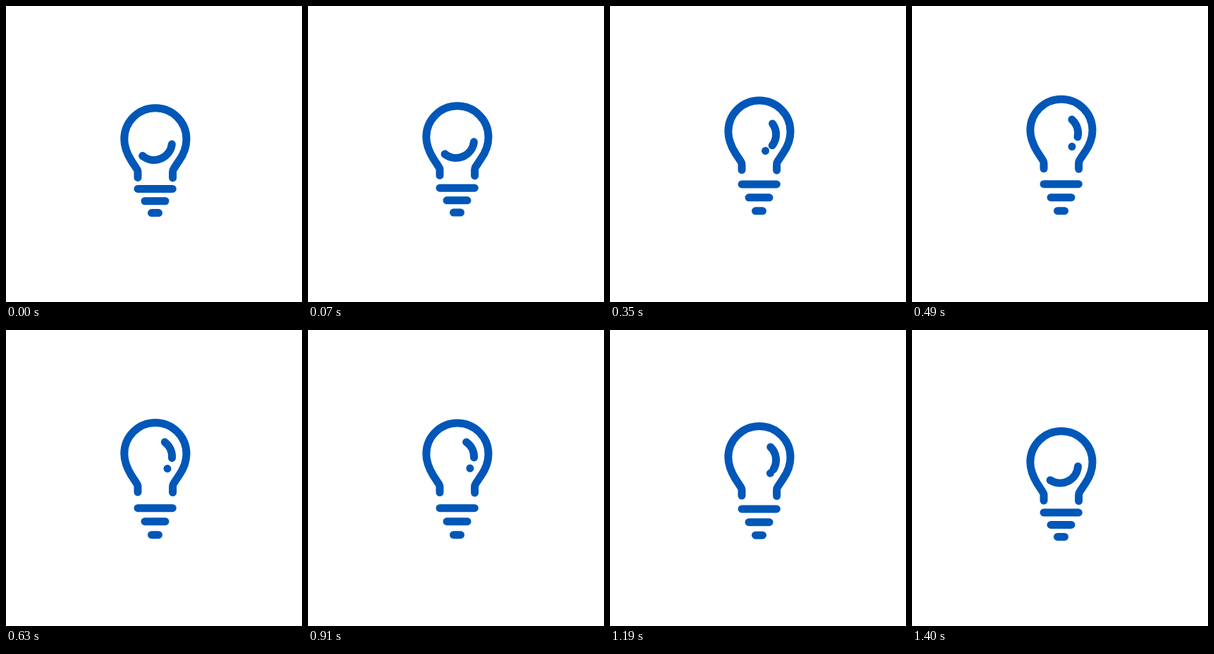
An HTML page that plays this animation: 420 by 420 pixels, repeating every 1470 ms.

```html
<!DOCTYPE html>
<html lang="en">
<head>
<meta charset="utf-8">
<title>Light bulb</title>
<style>
  html, body { margin: 0; width: 100%; height: 100%; overflow: hidden; background: #fff; }
  svg { display: block; width: 100%; height: 100%; }
  path { fill: none; stroke: #0057b8; stroke-width: 11; stroke-linecap: round; stroke-linejoin: round; }
</style>
</head>
<body>
<svg viewBox="0 0 420 420">
  <g id="bulb">
    <path d="M187 243.5V235.5Q187 233.5 185.6 231.4L177.8 219.5C172.3 210.5 167.8 201 167.8 189A44.1 44.1 0 0 1 256 189C256 201 251.6 211 245.6 219.5L238 231Q236.6 233 236.6 235.5V244"/>
    <path id="shine"/>
    <path id="dot"/>
  </g>
  <path id="bar1" d="M187 252.7H236.3"/>
  <path id="bar2" d="M197 271.7H226"/>
  <path id="bar3" d="M206.5 290.7H216.5"/>
</svg>
<script>
const LOOP = 1470, STEP = 70;
const TOP = 715; // when the bulb is highest
const $ = id => document.getElementById(id);

const mix = (a, b, k) => a + (b - a) * k;
const move = (id, y) => $(id).setAttribute('transform', `translate(0 ${y})`);

// S-curve from 1 to 0, half way down at time `half`.
const drop = (t, half, power) => 1 / (1 + (t / half) ** power);

// 1 at both ends of the loop, 0 in between.
const dip = (t, out, back, power) => drop(t, out, power) + drop(LOOP - t, back, power);

function arc(from, to) {
  const point = deg => {
    const a = deg * Math.PI / 180;
    return `${210 + 25.6 * Math.cos(a)} ${193 + 25.6 * Math.sin(a)}`;
  };
  return `M${point(from)}A25.6 25.6 0 0 1 ${point(to)}`;
}

function draw(ms) {
  const t = Math.floor(ms % LOOP / STEP) * STEP;
  const u = Math.abs(t - TOP) / (LOOP / 2);

  // The bulb is tossed up and falls; the bars sink only near the bottom.
  move('bulb', mix(-13.5, 0.8, u ** 2.4));
  const sink = (u * u * (3 - 2 * u)) ** 5;
  [6.8, 5.1, 2.9].forEach((depth, i) => move(`bar${i + 1}`, depth * sink));

  // The highlight slides round the glass and its tail splits off as a dot.
  const start = mix(-58, 7, dip(t, 282, 175, 3.3));
  const end = mix(36, 129, dip(t, 278, 150, 3.3));
  const gap = mix(38, 0, dip(t, 295, 295, 6));
  $('shine').setAttribute('d', arc(start, end - gap));
  $('dot').setAttribute('d', arc(end - 0.1, end));
}

const began = performance.now();
function tick() {
  draw(performance.now() - began);
  requestAnimationFrame(tick);
}
tick();
</script>
</body>
</html>
```
